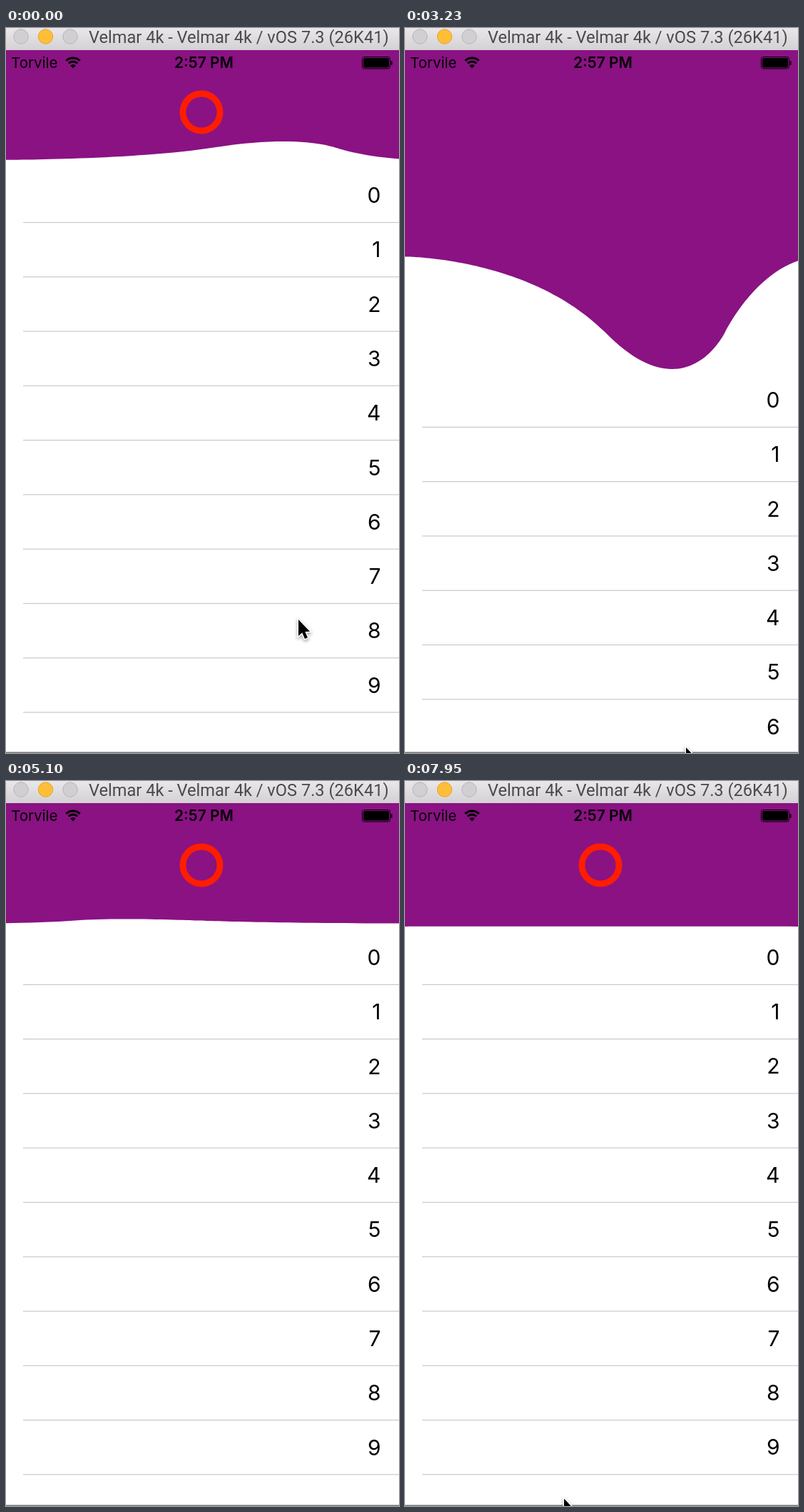
An HTML page with a canvas that plays this animation: 551 px wide and 1016 px high, repeating every 8 s.

```html
<!DOCTYPE html>
<html lang="en">
<head>
<meta charset="utf-8">
<title>Elastic pull to refresh</title>
<style>
  html, body { margin: 0; width: 100%; height: 100%; overflow: hidden; background: #fff; }
  canvas { display: block; }
</style>
</head>
<body>
<canvas id="stage" width="551" height="1016"></canvas>
<script>
const ctx = document.getElementById('stage').getContext('2d');
const W = 551, H = 1016, LOOP = 8000, STEP = 75;
const BAR = 31, REST = 204, ROW = 76.28;
const DRAG_TIME = 0.38, HOLD_TIME = 0.5, LOAD_TIME = 0.77, LOAD_GAP = 5;
const HOME = { x: 403, y: 333 }, RESISTANCE = 2.42;
const PURPLE = '#8a1283';

// Release time in seconds, finger x and pulled distance
const pulls = [
  { release: -0.196, x: 410, dist: 205 },
  { release: 1.662, x: 220, dist: 285 },
  { release: 3.225, x: 394, dist: 279 },
  { release: 4.801, x: 151, dist: 285 },
  { release: 6.099, x: 366, dist: 285 },
  { release: 7.25, x: 223, dist: 278 }
];

const clamp = v => Math.min(1, Math.max(0, v));
const mix = (a, b, u) => a + (b - a) * u;
const smooth = v => { v = clamp(v); return v * v * (3 - 2 * v); };

// Damped oscillation from 1 to 0, starting at rest
function spring(t, freq, decay) {
  return Math.exp(-decay * t) * (Math.cos(freq * t) + decay / freq * Math.sin(freq * t));
}

function poseAt(t) {
  const next = pulls.findIndex(p => p.release - DRAG_TIME > t);
  const pull = pulls.at(next < 0 ? -1 : next - 1);
  const since = t - pull.release;
  const away = { x: pull.x, y: HOME.y + pull.dist * RESISTANCE };

  if (since < 0) {
    const u = smooth(1 + since / DRAG_TIME);
    const d = pull.dist * u;
    return { x: pull.x, bulge: d, list: d, ring: 0, alpha: 0, pointer: between(HOME, away, u) };
  }

  // The list dips once and then stays, while the header keeps swinging
  let settle = spring(since, 23, 12.4);
  if (since > Math.PI / 23) settle = Math.min(settle, 0);
  const closing = clamp((since - LOAD_TIME) / 0.12);
  const back = next < 0 ? 0 :
    smooth((since - HOLD_TIME) / (pulls[next].release - DRAG_TIME - pull.release - HOLD_TIME));
  return {
    x: pull.x,
    bulge: pull.dist * spring(since, 16.1, 7.67),
    list: LOAD_GAP * (1 - closing) + (pull.dist - LOAD_GAP) * settle,
    ring: clamp(since / 0.127),
    alpha: 1 - closing,
    pointer: between(away, HOME, back)
  };
}

function between(a, b, u) {
  return { x: mix(a.x, b.x, u), y: mix(a.y, b.y, u) };
}

function text(str, x, y, font, color, align) {
  ctx.font = font;
  ctx.fillStyle = color;
  ctx.textAlign = align;
  ctx.fillText(str, x, y);
}

function disc(x, y, r, fill, edge) {
  ctx.beginPath();
  ctx.arc(x, y, r, 0, Math.PI * 2);
  ctx.fillStyle = fill;
  ctx.fill();
  ctx.strokeStyle = edge;
  ctx.lineWidth = 1;
  ctx.stroke();
}

function drawList(top) {
  for (let i = 0; i < 12; i++) {
    const y = top + ROW * (i + 1);
    ctx.fillStyle = '#c9c9cc';
    ctx.fillRect(24, y - 0.5, W - 24, 1.2);
    if (i < 10) text(i, 525.5, y - 27.3, '30px Inter, sans-serif', '#000', 'right');
  }
}

function drawHeader(x, bulge) {
  const base = REST + 0.418 * bulge, wave = 0.588 * bulge;
  const skew = (x - W / 2) * 0.28;
  const left = Math.min(skew, 0), right = W + Math.max(skew, 0);
  const lw = x - left, rw = right - x;
  const shoulder = base + wave * 0.64;
  const r1 = right - rw * 0.71;
  ctx.beginPath();
  ctx.moveTo(left, BAR);
  ctx.lineTo(left, base);
  ctx.bezierCurveTo(left, base, left + lw * 0.44, base, left + lw * 0.71, shoulder);
  ctx.bezierCurveTo(x, base + wave * 1.36, r1, shoulder, r1, shoulder);
  ctx.bezierCurveTo(r1, shoulder, right - rw * 0.44, base, right, base);
  ctx.lineTo(right, BAR);
  ctx.fillStyle = PURPLE;
  ctx.fill();
}

function drawRing(progress, alpha) {
  if (!progress || !alpha) return;
  ctx.globalAlpha = alpha;
  ctx.beginPath();
  ctx.arc(274, 118, 26, 0, Math.PI * 2 * progress);
  ctx.strokeStyle = '#ff1d00';
  ctx.lineWidth = 9;
  ctx.stroke();
  ctx.globalAlpha = 1;
}

function drawStatus() {
  text('Torvile', 7, 56, '20.5px Inter, sans-serif', '#000', 'left');
  text('2:57 PM', 277.5, 56, '600 21px Inter, sans-serif', '#000', 'center');

  const up = -Math.PI / 2, spread = 0.76;
  ctx.strokeStyle = ctx.fillStyle = '#000';
  ctx.lineWidth = 3;
  for (const r of [9, 14]) {
    ctx.beginPath();
    ctx.arc(94, 56, r, up - spread, up + spread);
    ctx.stroke();
  }
  ctx.beginPath();
  ctx.moveTo(94, 56.5);
  ctx.arc(94, 56.5, 5.5, up - spread, up + spread);
  ctx.fill();

  ctx.lineWidth = 1;
  ctx.beginPath();
  ctx.roundRect(499.5, 40.5, 39, 16.5, 3);
  ctx.stroke();
  ctx.beginPath();
  ctx.roundRect(501, 42, 36, 13.5, 2);
  ctx.roundRect(539.5, 46, 2, 6, 1);
  ctx.fill();
}

function drawTitleBar() {
  const shade = ctx.createLinearGradient(0, 0, 0, BAR);
  shade.addColorStop(0, '#e9e7e9');
  shade.addColorStop(1, '#d3d1d3');
  ctx.fillStyle = shade;
  ctx.fillRect(0, 0, W, BAR);
  for (let i = 0; i < 3; i++) {
    const lit = i === 1;
    disc(21 + i * 34.5, 12, 10.2, lit ? '#ffbe37' : '#d1cfd1', lit ? '#e2a431' : '#b7b5b7');
  }
  text('Velmar 4k - Velmar 4k / vOS 7.3 (26K41)', 116, 21, '23.6px Roboto, sans-serif', '#4b4a4b', 'left');
}

function drawPointer({ x, y }) {
  ctx.save();
  ctx.translate(x, y);
  const arrow = new Path2D('M0 0V23L5.2 18.2L9 27L13 25.2L9.3 16.8L16 16.6Z');
  ctx.shadowColor = 'rgba(0,0,0,.4)';
  ctx.shadowBlur = 4;
  ctx.shadowOffsetY = 2;
  ctx.strokeStyle = '#fff';
  ctx.lineWidth = 3;
  ctx.stroke(arrow);
  ctx.shadowColor = 'transparent';
  ctx.fillStyle = '#000';
  ctx.fill(arrow);
  ctx.restore();
}

function draw(ms) {
  const t = Math.floor((ms + 5) / STEP) * STEP / 1000;
  const pose = poseAt(t);
  ctx.fillStyle = '#fff';
  ctx.fillRect(0, 0, W, H);
  drawList(REST + pose.list);
  drawHeader(pose.x, pose.bulge);
  drawRing(pose.ring, pose.alpha);
  drawStatus();
  drawTitleBar();
  ctx.fillStyle = '#777';
  ctx.fillRect(0, H - 1.5, W, 1.5);
  drawPointer(pose.pointer);
}

const begin = performance.now();
function tick() {
  draw((performance.now() - begin) % LOOP);
  requestAnimationFrame(tick);
}
tick();
</script>
</body>
</html>
```
